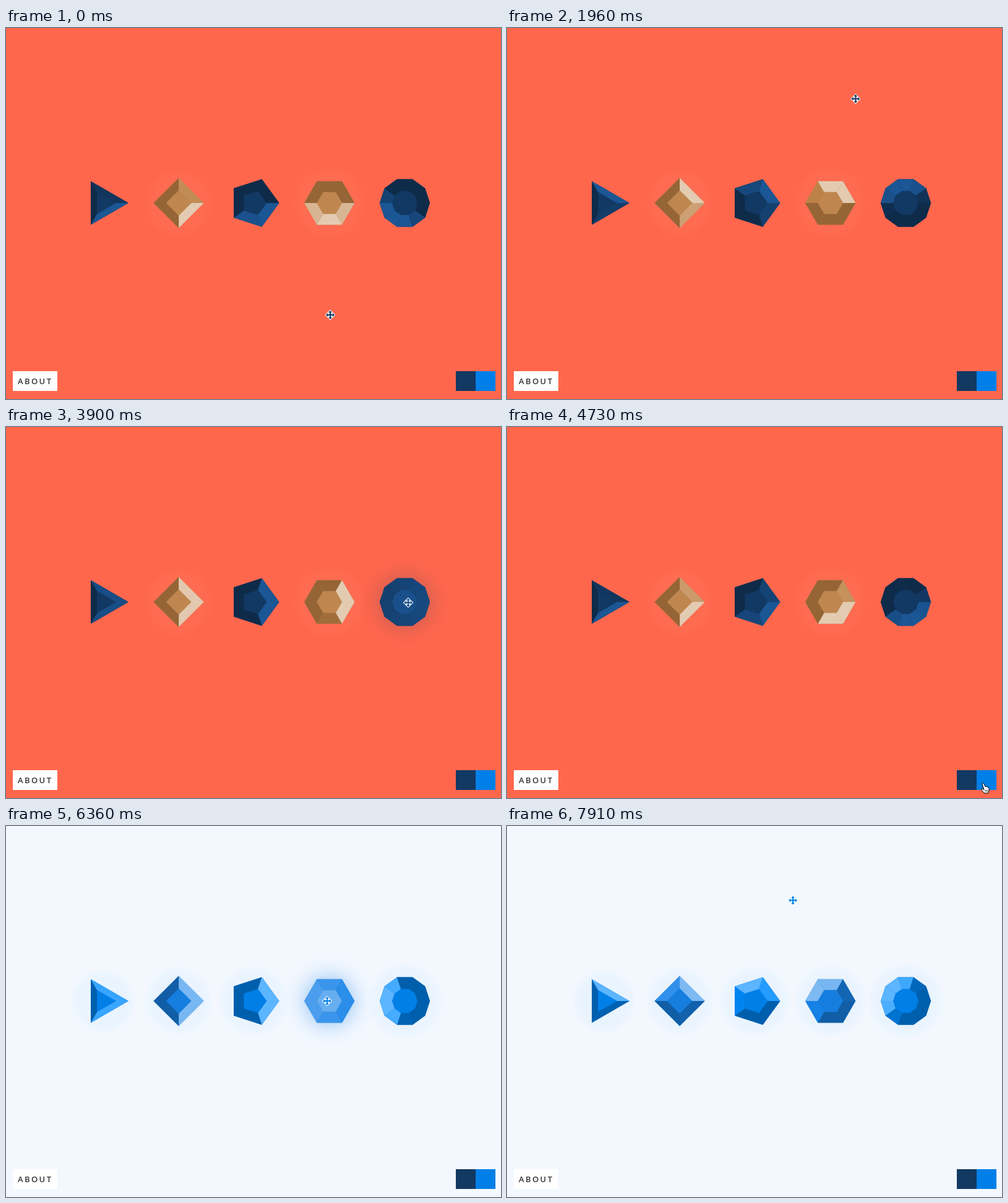
Recreate the animation shown at these times as an HTML page with a canvas. Size 800 by 600 pixels, loop 8000 ms.

```html
<!DOCTYPE html>
<html>
<head>
<meta charset="utf-8">
<style>
  html, body { margin: 0; width: 800px; height: 600px; overflow: hidden; }
  canvas, .about, .swatch { position: absolute; }
  canvas { left: 0; top: 0; }
  .about, .swatch { top: 555px; height: 32px; }
  .about { left: 11px; width: 64px; padding-left: 8px; background: #fff; color: #333;
    font: 600 13px/33px "Open Sans", "Noto Sans", sans-serif; letter-spacing: 2.4px; white-space: nowrap; }
  .swatch { width: 32px; }
</style>
</head>
<body>
<div class="about">ABOUT</div>
<div class="swatch" style="left:727px;background:#123962"></div>
<div class="swatch" style="left:759px;background:#007fe8"></div>
<canvas width="800" height="600"></canvas>
<script>
const ctx = document.querySelector('canvas').getContext('2d');
const LOOP = 8000, THEME_SWITCH = 4960, RADIUS = 40.6, CENTER_Y = 283;

// Each theme: page colour, halo colour, and hue / saturation / lightness of even and odd gems
const themes = [
  { page: '#ff674d', halo: '255,109,82', glow: 0.3, gems: [[211, 69, 23], [30, 47, 53]] },
  { page: '#f3f8ff', halo: '231,243,254', glow: 0.5, gems: [[207, 100, 45.3], [209, 82, 48]] }
];
const gems = [3, 4, 5, 6, 10].map((sides, i) =>
  ({ sides, x: 157.3 + 121.8 * i, halo: 60 - 42 / sides, odd: i % 2 }));

// Pointer strokes: each is a circular arc from the previous end, turning by `turn` degrees
const home = { x: 524, y: 464 };
const strokes = [
  [470, 900, 88, 310, 70], [900, 1740, 610, 124, 50],
  [1860, 1960, 564, 115, 0], [1960, 2700, 300, 368, -155],
  [2780, 3040, 415, 288, 0],
  [3400, 3880, 650, 284, 0],
  [4250, 4640, 771, 576, 0],
  [5220, 5550, 696, 353, -20], [5550, 5820, 650, 285, 0],
  [6170, 6290, 519, 283, 0],
  [6570, 7050, 380, 506, 40],
  [7260, 7560, 60, 270, 70], [7560, 7910, 461, 120, 75], [7910, 8000, 560, 150, 20]
].map(([start, end, x, y, turn]) => ({ start, end, x, y, turn: turn * Math.PI / 180 }));

const clamp = (v, lo, hi) => Math.max(lo, Math.min(hi, v));
const mix = (a, b, k) => a + (b - a) * k;
const mean = list => list.reduce((a, b) => a + b, 0) / list.length;

function pointerAt(t) {
  const i = strokes.findLastIndex(s => s.start <= t);
  if (i < 0) return home;
  const to = strokes[i], from = strokes[i - 1] || home, next = strokes[i + 1];
  const u = Math.min(1, (t - to.start) / (to.end - to.start));
  // Strokes that touch in time flow into each other; the others start or stop at rest
  const v0 = +(from.end === to.start), v1 = +(!next || next.start === to.end);
  const p = u * u * (3 - 2 * u) + u * (1 - u) * ((1 - u) * v0 - u * v1);
  const half = to.turn / 2;
  const k = half ? Math.sin(half * p) / Math.sin(half) : p;
  const a = half * (p - 1), dx = to.x - from.x, dy = to.y - from.y;
  return {
    x: from.x + k * (dx * Math.cos(a) - dy * Math.sin(a)),
    y: from.y + k * (dx * Math.sin(a) + dy * Math.cos(a))
  };
}

function polygon(points, fill) {
  ctx.beginPath();
  points.forEach(p => ctx.lineTo(p[0], p[1]));
  ctx.closePath();
  ctx.fillStyle = fill;
  ctx.fill();
}

function drawHalo(gem, theme, hover) {
  if (theme === themes[0] && !gem.odd) return;
  const g = ctx.createRadialGradient(gem.x, CENTER_Y, 0, gem.x, CENTER_Y, gem.halo + 4);
  [[0, 1], [0.75, 0.85], [1, 0.3]].forEach(([stop, alpha]) =>
    g.addColorStop(stop, `rgba(${theme.halo},${alpha * (1 - hover)})`));
  ctx.fillStyle = g;
  ctx.beginPath();
  ctx.arc(gem.x, CENTER_Y, gem.halo + 4, 0, 7);
  ctx.fill();
}

function drawGem(gem, theme, trail) {
  const [h, s, l] = theme.gems[gem.odd];
  const tone = k => `hsl(${h},${s}%,${l * k}%)`;
  const corner = (i, r) => {
    const a = i * 2 * Math.PI / gem.sides;
    return [gem.x + r * Math.cos(a), CENTER_Y + r * Math.sin(a)];
  };
  const ring = r => Array.from({ length: gem.sides }, (_, i) => corner(i, r));
  const hover = mean(trail.slice(0, 6).map(p => +(Math.hypot(p.x - gem.x, p.y - CENTER_Y) < 38)));
  const angles = trail.map(p => Math.atan2(p.y - CENTER_Y, p.x - gem.x));

  drawHalo(gem, theme, hover);
  ctx.save();
  ctx.shadowBlur = 36;
  ctx.shadowColor = `hsla(${h},${s}%,${l}%,${theme.glow * hover})`;
  polygon(ring(RADIUS), tone(0.9));
  ctx.restore();

  for (let i = 0; i < gem.sides; i++) {
    const mid = (i + 0.5) * 2 * Math.PI / gem.sides;
    const light = mean(angles.map(a => Math.min(1, 1.2 * Math.max(0, Math.cos(a - mid)) ** 0.6)));
    const lit = 1.2 + 0.08 * Math.cos(angles[0] - mid);
    polygon([corner(i, RADIUS), corner(i + 1, RADIUS), corner(i + 1, RADIUS / 2), corner(i, RADIUS / 2)],
      tone(mix(0.75 + 0.75 * light, lit, hover)));
  }
  polygon(ring(RADIUS / 2), tone(mix(1, 1.4, hover)));
}

const arrows = new Path2D('M0-7L3-4H1V-1H4V-3L7 0L4 3V1H1V4H3L0 7L-3 4H-1V1H-4V3L-7 0L-4-3V-1H-1V-4H-3Z');
const hand = new Path2D('M-3 1Q-2-1 0 1L2 6L3 5L5 6L7 7Q8 7 8 9V12L7 16H0L-4 11Q-5 8-2 9L0 11Z');
const fingers = new Path2D('M2 11V14M4 11V14M6 11V14');

function drawPointer({ x, y }) {
  const onSwatch = x > 727 && x < 791 && y > 555 && y < 587;
  ctx.save();
  ctx.translate(x, y);
  ctx.lineJoin = 'round';
  if (onSwatch) {
    ctx.fillStyle = '#fff';
    ctx.fill(hand);
    ctx.stroke(hand);
    ctx.lineWidth = 0.7;
    ctx.stroke(fingers);
  } else {
    ctx.strokeStyle = '#fff';
    ctx.lineWidth = 2;
    ctx.stroke(arrows);
    ctx.fill(arrows);
  }
  ctx.restore();
}

function draw(t) {
  const theme = themes[+(t >= THEME_SWITCH)];
  // The gems follow the recent pointer positions, so light and hover lag a little
  const trail = Array.from({ length: 8 }, (_, i) => pointerAt(t - i * 20));
  document.body.style.background = theme.page;
  ctx.clearRect(0, 0, 800, 600);
  gems.forEach(gem => drawGem(gem, theme, trail));
  drawPointer(trail[0]);
}

const begin = performance.now();
function tick() {
  draw((performance.now() - begin) % LOOP);
  requestAnimationFrame(tick);
}
tick();
</script>
</body>
</html>
```
